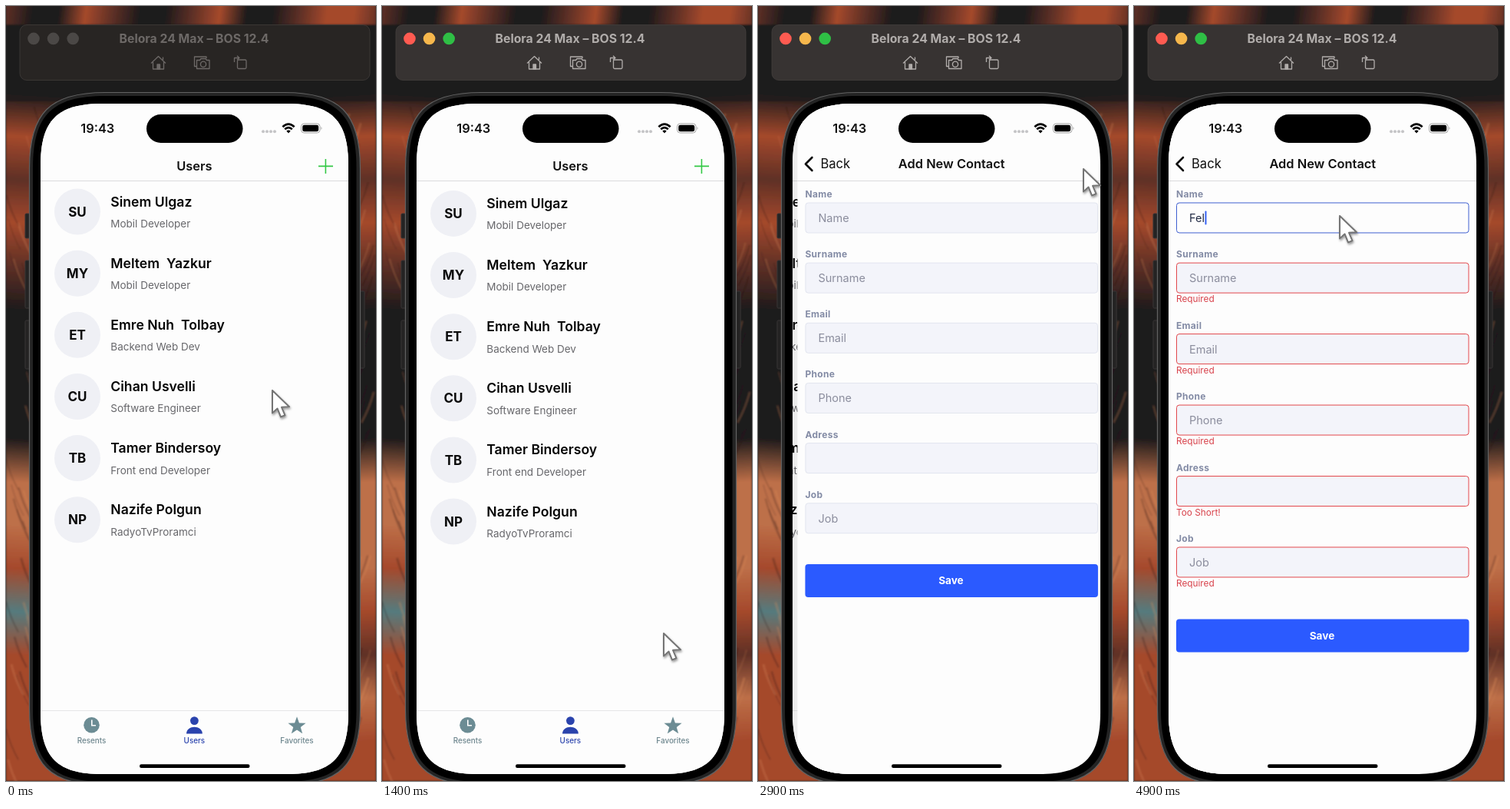
Write an HTML page that moves like this. It is 482 by 1008 pixels and loops after 5000 ms.

```html
<!DOCTYPE html>
<html lang="en">
<head>
<meta charset="utf-8">
<title>Contacts demo</title>
<style>
  html, body { margin: 0; height: 100%; overflow: hidden; background: #1d1a1b; }
  svg { display: block; width: 100vw; height: 100vh; }
  text { font-family: Inter, "Open Sans", sans-serif; white-space: pre; }
  .mid { text-anchor: middle; }
  .heading { font-size: 16.4px; font-weight: 600; fill: #111; }
  .name { font-size: 17.6px; font-weight: 600; fill: #050505; }
  .job { font-size: 13.5px; fill: #67676b; }
  .initials { font-size: 17px; font-weight: 700; fill: #0a0a0a; }
  .tab { font-size: 9.9px; font-weight: 500; fill: #6c858d; }
  .tab.on { fill: #2a43ad; }
  .label { font-size: 12px; font-weight: 700; fill: #838ba5; letter-spacing: .3px; }
  .hint { font-size: 14.5px; fill: #8b8d9d; }
  .error { font-size: 11.8px; fill: #d8434c; }
  .back { font-size: 16.6px; fill: #111; }
  .save { font-size: 13.6px; font-weight: 700; fill: #fff; }
  .title { font-size: 15.8px; font-weight: 700; fill: currentColor; }
  .tools { fill: none; stroke: currentColor; stroke-width: 1.3; stroke-linejoin: round; }
</style>
</head>
<body>
<svg id="stage" viewBox="0 0 482 1008" xmlns="http://www.w3.org/2000/svg"></svg>
<script>
const LOOP = 5000, STEP = 100;
const LEFT = 45, TOP = 127, WIDTH = 401, HEIGHT = 872;
const PAPER = '#fdfdfd';

const people = [
  ['Sinem Ulgaz', 'SU', 'Mobil Developer'],
  ['Meltem  Yazkur', 'MY', 'Mobil Developer'],
  ['Emre Nuh  Tolbay', 'ET', 'Backend Web Dev'],
  ['Cihan Usvelli', 'CU', 'Software Engineer'],
  ['Tamer Bindersoy', 'TB', 'Front end Developer'],
  ['Nazife Polgun', 'NP', 'RadyoTvProramci'],
];
const fields = ['Name', 'Surname', 'Email', 'Phone', 'Adress', 'Job'];

const rect = (x, y, w, h, r, fill, extra = '') =>
  `<rect x="${x}" y="${y}" width="${w}" height="${h}" rx="${r}" fill="${fill}" ${extra}/>`;
const text = (x, y, cls, value) => `<text x="${x}" y="${y}" class="${cls}">${value}</text>`;
const repeat = (n, make) => Array.from({ length: n }, (_, i) => make(i)).join('');

// Rectangle whose corners ease in and out of the straight sides
function smoothRect(x, y, w, h, r, extra = '') {
  const e = 1.3 * r, c = .348 * r, R = x + w, B = y + h;
  return `<path d="M${x} ${y + e}C${x} ${y + c} ${x + c} ${y} ${x + e} ${y}
    H${R - e}C${R - c} ${y} ${R} ${y + c} ${R} ${y + e}
    V${B - e}C${R} ${B - c} ${R - c} ${B} ${R - e} ${B}
    H${x + e}C${x + c} ${B} ${x} ${B - c} ${x} ${B - e}Z" ${extra}/>`;
}

let seed = 7;
const random = () => (seed = seed * 16807 % 2147483647) / 2147483647;

// Blurred flower photo: evenly spaced tones along each edge, with petal streaks on top
const tones = { d: '#1f1b1c', b: '#5f3026', o: '#a5492c', p: '#bd6f48', t: '#557b7e' };
const gradient = (id, keys, direction) =>
  `<linearGradient id="${id}" gradientUnits="userSpaceOnUse" ${direction}>${
    [...keys].map((k, i) => `<stop offset="${i / (keys.length - 1)}" stop-color="${tones[k]}"/>`).join('')
  }</linearGradient>`;
const streak = () => {
  const x = random() * 482, y = 130 + random() * 880, lean = x < 241 ? 1 : -1;
  return `<path d="M${x} ${y}q${lean * 5} 20 ${lean * 16} 40" fill="none" stroke-width="${1 + 2 * random()}"
    stroke="${random() < .6 ? '#2a1716' : '#e0905f'}" stroke-opacity=".28"/>`;
};
const wallpaper = `
  ${rect(0, 0, 241, 1008, 0, 'url(#leftTones)')}
  ${rect(241, 0, 241, 1008, 0, 'url(#rightTones)')}
  ${repeat(500, streak)}
  ${rect(0, 24, 482, 100, 0, tones.d, 'opacity=".8"')}
  ${rect(0, -5, 482, 29, 0, 'url(#topTones)')}`;

const rows = people.map(([name, initials, job], i) => `
  <g transform="translate(0 ${i * 80.13})">
    <circle cx="93" cy="267.6" r="30" fill="#eff0f5"/>
    ${text(93, 273.8, 'initials mid', initials)}
    ${text(136.3, 260.6, 'name', name)}
    ${text(136.3, 288, 'job', job)}
  </g>`).join('');

const star = Array.from({ length: 10 }, (_, i) => {
  const r = i % 2 ? 5 : 12.2, a = i * Math.PI / 5;
  return `${379 + r * Math.sin(a)},${936.5 - r * Math.cos(a)}`;
}).join(' ');

const sheet = rect(LEFT, TOP, WIDTH, HEIGHT, 0, PAPER);
const headerLine = '<path d="M45 227.5H446" stroke="#dadadc"/>';

const listPage = `
  <g id="list">
    ${sheet}
    <g id="rows">${rows}</g>
    ${rect(LEFT, TOP, WIDTH, 100, 0, PAPER)}
    ${headerLine}
    ${text(245.3, 214, 'heading mid', 'Users')}
    <path d="M407 208.4H426M416.4 199V218" stroke="#34c846" stroke-width="1.6"/>
    ${rect(LEFT, 916, WIDTH, 84, 0, PAPER)}
    <path d="M45 916.5H446" stroke="#e6e6e8"/>
    <circle cx="111.5" cy="935.3" r="10.3" fill="#6c8c94"/>
    <path d="M111.8 928.5V935.8H117" fill="none" stroke="#fff" stroke-width="1.6"/>
    <g fill="#2a43ad"><circle cx="245.4" cy="929.6" r="5.4"/>
      <path d="M235 946.5C235 934.8 255.8 934.8 255.8 946.5Z"/></g>
    <polygon points="${star}" fill="#6c8c94"/>
    ${text(111.5, 959, 'tab mid', 'Resents')}
    ${text(245.4, 959, 'tab on mid', 'Users')}
    ${text(379, 959, 'tab mid', 'Favorites')}
  </g>`;

const formRows = fields.map((name, i) => `
  <g class="field">
    ${text(55, 249, 'label', name)}
    ${rect(55.5, 256, 380.5, 39, 3.5, '#f3f4fa', 'class="box"')}
    ${text(72, 281, 'hint', name === 'Adress' ? '' : name)}
    ${i ? text(55, 307.2, 'error', name === 'Adress' ? 'Too Short!' : 'Required') : ''}
  </g>`).join('');

const formPage = `
  <g id="form">
    ${sheet}
    ${headerLine}
    <path d="M64 197L55.5 205.5L64 214" fill="none" stroke="#111" stroke-width="2.6"
      stroke-linecap="round" stroke-linejoin="round"/>
    ${text(75, 211.3, 'back', 'Back')}
    ${text(245.8, 211.3, 'heading mid', 'Add New Contact')}
    ${formRows}
    ${rect(72, 266.5, 2, 18, 1, '#3561f2', 'id="caret"')}
    <g id="save">
      ${rect(55, 726, 381.5, 43, 4, '#2b5aff')}
      ${text(245, 752.3, 'save mid', 'Save')}
    </g>
  </g>`;

const statusBar = `
  ${text(119.3, 165, 'heading mid', '19:43')}
  ${rect(183, 141, 125.5, 37, 18.5, '#000')}
  ${repeat(4, i => `<circle cx="${335 + 5 * i}" cy="163.3" r="2" fill="#c5c5c7"/>`)}
  <path d="M360.4 157.2Q368 150 375.6 157.2M363.2 160.3Q368 155.8 372.8 160.3"
    fill="none" stroke="#000" stroke-width="2.7"/>
  <path d="M368 165.4L365.3 162.6Q368 160.3 370.7 162.6Z"/>
  ${rect(384.5, 153, 24.5, 12, 3.8, 'none', 'stroke="#a5a5a5"')}
  ${rect(386.2, 154.7, 21, 8.6, 2.4, '#000')}
  <path d="M410.5 157Q412.5 159 410.5 161Z" fill="#a5a5a5"/>
  ${rect(174, 986.3, 143.5, 4.7, 2.3, '#000')}`;

const simulatorBar = `
  <rect id="bar" x="18" y="24.5" width="456" height="72" rx="9" stroke="#4b4744" stroke-opacity=".6"/>
  ${repeat(3, i => `<circle class="light" cx="${36 + 25.6 * i}" cy="42.4" r="7.8"/>`)}
  <g id="barInk">
    ${text(245, 47.6, 'title mid', 'Belora 24 Max – BOS 12.4')}
    <g class="tools">
      <path d="M189 74.5L198.5 65.5L208 74.5M191.5 73V82H205.5V73M204.5 70V66.5"/>
      <path d="M197 82V76H200.500V82Z" fill="currentColor"/>
      <path d="M248 78.5H245.5V66H261V68M248.5 70.5H252.5L254 68.5H260L261.5 70.5H265V81.5H248.5Z"/>
      <circle cx="257" cy="75.8" r="3.6"/>
      ${rect(301.5, 70, 11.5, 11.5, 1.5, 'none')}
      <path d="M297.5 73V67.5H303.5M301 64.8L304 67.5L301 70"/>
    </g>
  </g>`;

const sideButton = (x, y, h) => rect(x, y, 6, h, 1.5, '#242323', 'stroke="#383637"');

document.getElementById('stage').innerHTML = `
  <defs>
    <clipPath id="screen">${smoothRect(LEFT, TOP, WIDTH, HEIGHT, 62)}</clipPath>
    ${gradient('leftTones', 'dddobobddddppotoooo', 'x1="0" y1="0" x2="-60" y2="1008"')}
    ${gradient('rightTones', 'dddobobddddpppobpoo', 'x1="482" y1="0" x2="542" y2="1008"')}
    ${gradient('topTones', 'bddobddboddboob', 'x1="0" y1="0" x2="482" y2="60"')}
    <filter id="soft"><feGaussianBlur stdDeviation="1"/></filter>
    <filter id="shadow" x="-50%" y="-50%" width="200%" height="200%">
      <feDropShadow dx="1" dy="2" stdDeviation="1.4" flood-opacity=".4"/></filter>
  </defs>
  <g filter="url(#soft)">${wallpaper}</g>
  ${simulatorBar}
  ${sideButton(25, 270, 32)}${sideButton(25, 331, 62)}${sideButton(25, 409, 63)}${sideButton(461, 371, 100)}
  ${smoothRect(30.5, 112.5, 431, 901, 76, 'fill="#242424" stroke="#626262" stroke-width="1.2"')}
  ${smoothRect(35, 117, 421.5, 892, 72)}
  <g clip-path="url(#screen)">
    ${listPage}
    <rect id="dim" x="${LEFT}" y="${TOP}" width="${WIDTH}" height="${HEIGHT}"/>
    ${formPage}
    ${statusBar}
  </g>
  <path id="cursor" d="M0 0V29.5L6.500 23.5L11 34.5L16.500 32.300L12 21.800L22 21.300Z"
    fill="#fff" stroke="#747474" stroke-width="2" stroke-linejoin="round" filter="url(#shadow)"/>`;

const $ = id => document.getElementById(id);
const all = selector => [...document.querySelectorAll(selector)];
const boxes = all('.box'), fieldGroups = all('.field'), errors = all('.error');
const lights = all('.light'), firstHint = all('.hint')[0];
const move = (el, x, y) => el.setAttribute('transform', `translate(${x} ${y})`);

const ACTIVATE = 100, RELEASE = 870, PUSH = 2600, FOCUS = 3900, TYPE = 4500;

// Cursor stops: drag down, rest, go to the plus, go to the first field
const stops = [
  { t: ACTIVATE, x: 347, y: 500 },
  { t: 900, x: 367, y: 816 },
  { t: 1500, x: 367, y: 816 },
  { t: 2500, x: 428, y: 207 },
  { t: 2900, x: 424, y: 212 },
  { t: 3800, x: 268, y: 273 },
];
const easeInOut = u => u * u * (3 - 2 * u);
function cursorAt(t) {
  const next = stops.findIndex(stop => stop.t > t);
  if (next < 1) return next ? stops[stops.length - 1] : stops[0];
  const a = stops[next - 1], b = stops[next];
  const u = easeInOut((t - a.t) / (b.t - a.t));
  return { x: a.x + (b.x - a.x) * u, y: a.y + (b.y - a.y) * u };
}

// Remaining share of a critically damped spring
const spring = (ms, rate) => {
  const x = Math.max(0, ms) * rate / 1000;
  return (1 + x) * Math.exp(-x);
};

// Rubber-band overscroll while dragging, then a springy return
function pullAt(t) {
  const view = 690, slop = 20;
  const drag = Math.max(0, cursorAt(Math.min(t, RELEASE)).y - stops[0].y - slop);
  const stretch = view * (1 - 1 / (drag * .55 / view + 1));
  return stretch * spring(t - RELEASE, 11.3);
}

function draw(t) {
  const active = t >= ACTIVATE, focused = t >= FOCUS, invalid = t >= TYPE;
  $('bar').setAttribute('fill', active ? '#373332' : '#282523');
  $('barInk').style.color = active ? '#b1adab' : '#6d6967';
  lights.forEach((el, i) => el.setAttribute('fill', active ? ['#ff5b51', '#f6b74c', '#2fbf45'][i] : '#4b4846'));

  const { x, y } = cursorAt(t);
  move($('cursor'), x, y);
  move($('rows'), 0, pullAt(t));

  const left = spring(t - PUSH, 20.3);
  move($('form'), WIDTH * left, 0);
  move($('list'), -.3 * WIDTH * (1 - left), 0);
  $('dim').setAttribute('opacity', .06 * (1 - left));

  const typed = 'Fel'.slice(0, Math.max(0, 1 + Math.floor((t - TYPE) / 200)));
  firstHint.textContent = typed || 'Name';
  firstHint.style.fill = typed ? '#222b45' : '';
  $('caret').style.display = focused ? '' : 'none';
  move($('caret'), typed ? firstHint.getComputedTextLength() + .5 : 0, 0);

  const gap = invalid ? 14.3 : 0;
  fieldGroups.forEach((el, i) => move(el, 0, i * 78.15 + gap * Math.max(0, i - 1)));
  move($('save'), 0, gap * 5);
  errors.forEach(el => { el.style.display = invalid ? '' : 'none'; });
  boxes.forEach((el, i) => {
    const current = focused && i === 0;
    el.setAttribute('fill', current ? PAPER : '#f3f4fa');
    el.setAttribute('stroke', current ? '#3e5fd0' : invalid ? '#e2484c' : '#e2e5ef');
  });
}

const start = performance.now();
function tick() {
  const t = (performance.now() - start) % LOOP;
  draw(Math.floor(t / STEP) * STEP);
  requestAnimationFrame(tick);
}
tick();
</script>
</body>
</html>
```
